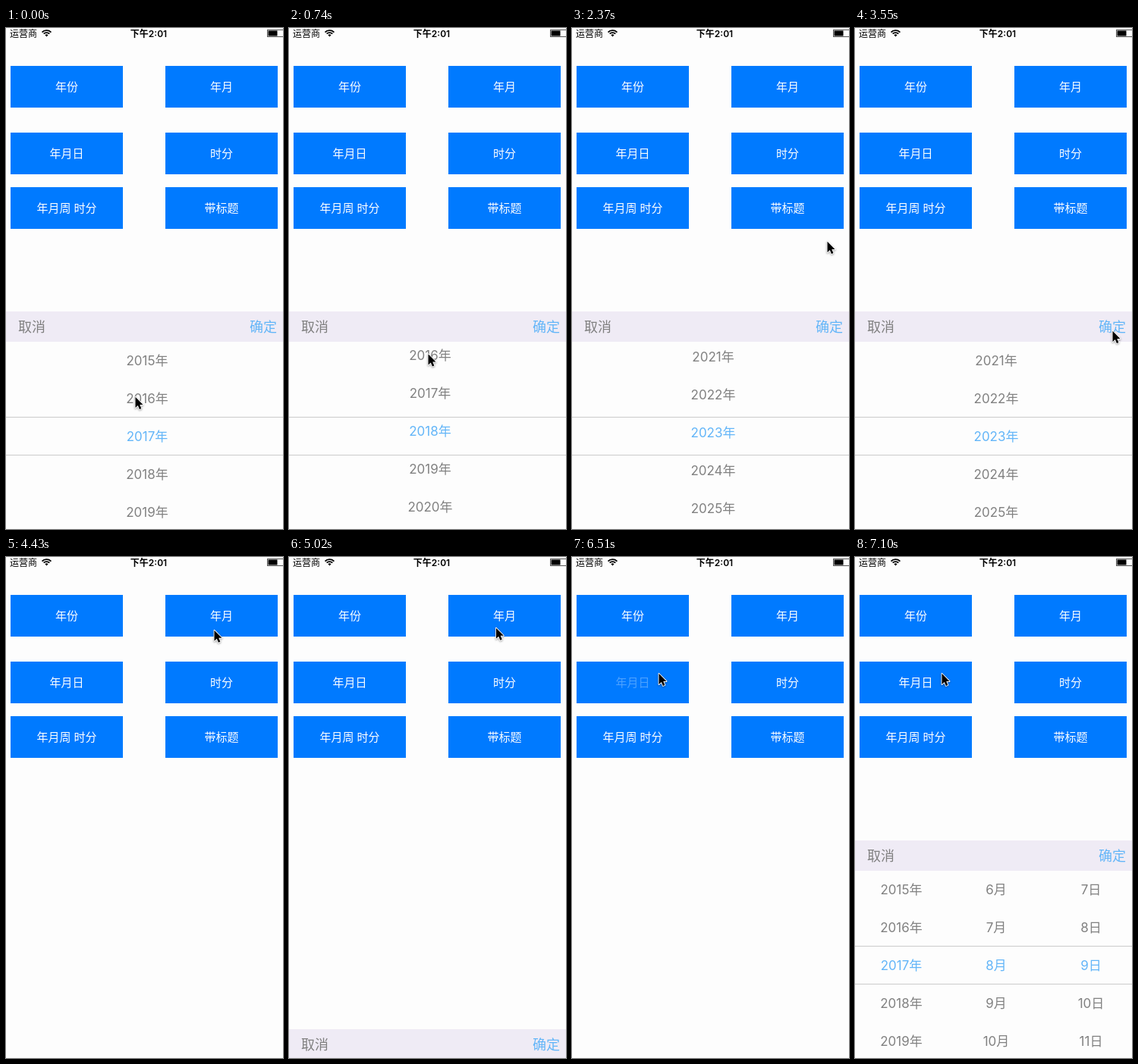
Animation of 365 by 661 pixels, one loop 7990 ms. Source, as an HTML page with a canvas:

```html
<!DOCTYPE html>
<html lang="zh-CN">
<head>
<meta charset="utf-8">
<title>日期选择器</title>
<style>
html, body { margin: 0; width: 100%; height: 100%; overflow: hidden; background: #fdfdfd; }
canvas { display: block; width: 365px; height: 661px; }
</style>
</head>
<body>
<canvas id="stage" width="365" height="661"></canvas>
<script>
const ctx = document.getElementById('stage').getContext('2d');
const W = 365, H = 661, LOOP = 7990, TICK = 147.7;
const PANEL_TOP = 374, BAR = 40, ROW = 50, MID = 538.5;
const FONT = 'Inter, "Noto Sans CJK SC", "Noto Sans CJK", sans-serif';
const BG = '#fdfdfd', BLUE = '#007aff', GRAY = '#808080', SKY = '#62b5f8';

const BUTTONS = [
  [6, 50, '年份'], [210, 50, '年月'],
  [6, 138, '年月日'], [210, 138, '时分'],
  [6, 210, '年月周 时分'], [210, 210, '带标题']
];

// Pointer stops: time, x, y
const POINTER = [
  [0, 170, 486], [300, 171, 486], [850, 186, 396], [1040, 230, 402],
  [1180, 268, 399], [1330, 314, 326], [1478, 336, 281], [2520, 336, 281],
  [2670, 342, 290], [2960, 349, 335], [3250, 346, 385], [3540, 339, 399],
  [3780, 339, 399], [3990, 334, 340], [4140, 318, 225], [4290, 290, 130],
  [4430, 274, 96], [4730, 273, 90], [5020, 273, 90], [5170, 262, 140],
  [5310, 240, 220], [5460, 216, 290], [5610, 206, 314], [6000, 206, 314],
  [6210, 170, 240], [6360, 120, 165], [6500, 114, 153]
];

const clamp = v => Math.max(0, Math.min(1, v));
const ramp = (t, from, to) => clamp((t - from) / (to - from));
const ease = p => p * p * (3 - 2 * p);
const slide = (t, from) => ease(ramp(t, from, from + 300));

// Drag, then momentum, then snap to the nearest row
function wheelOffset(t) {
  if (t < 850) return 90 * ramp(t, 200, 850) ** 2.5;
  const glide = 316 - 64 * Math.exp((1480 - Math.min(t, 2380)) / 500);
  return glide + (300 - glide) * ease(ramp(t, 2400, 2800));
}

function pointerAt(t) {
  let i = POINTER.findIndex(p => p[0] > t);
  if (i < 0) i = POINTER.length;
  const a = POINTER[i - 1], b = POINTER[i] || a;
  const p = a === b ? 0 : ramp(t, a[0], b[0]);
  const x = a[1] + (b[1] - a[1]) * p;
  const y = t < 850 ? 486 - wheelOffset(t) : a[2] + (b[2] - a[2]) * p;
  return [x, y];
}

// Share of the panel that is hidden below the stage
function hiddenShare(t) {
  if (t < 4500) return slide(t, 3760);
  if (t < 5900) return 1 - slide(t, 4960);
  if (t < 6600) return slide(t, 6000);
  return 1 - slide(t, 6730);
}

function rect(x, y, w, h, color) {
  ctx.fillStyle = color;
  ctx.fillRect(x, y, w, h);
}

function label(str, x, cy, size, color, align = 'center', weight = 400) {
  ctx.font = `${weight} ${size}px ${FONT}`;
  ctx.textAlign = align;
  ctx.fillStyle = color;
  ctx.fillText(str, x, cy + size * 0.375);
}

function statusBar() {
  label('运营商', 5, 7.2, 12, '#000', 'left');
  label('下午2:01', 188, 7.2, 12, '#000', 'center', 600);

  ctx.strokeStyle = '#000';
  ctx.lineWidth = 1.8;
  for (const r of [8.2, 5.2]) {
    ctx.beginPath();
    ctx.arc(53.5, 11.3, r, -Math.PI * 0.76, -Math.PI * 0.24);
    ctx.stroke();
  }
  ctx.fillStyle = '#000';
  ctx.beginPath();
  ctx.moveTo(53.5, 11.6);
  ctx.arc(53.5, 11.3, 2.9, -Math.PI * 0.76, -Math.PI * 0.24);
  ctx.fill();

  ctx.lineWidth = 1;
  ctx.strokeStyle = '#555';
  ctx.strokeRect(344.5, 2.5, 24, 9);
  rect(345.5, 3.5, 12, 7, '#000');
}

function buttons(pressed) {
  BUTTONS.forEach(([x, y, text], i) => {
    rect(x, y, 148, 55, BLUE);
    const color = i === pressed ? 'rgba(255,255,255,.3)' : '#fff';
    label(text, x + 74, y + 27.5, 15, color, 'center', 350);
  });
}

function column(x, first, unit, offset) {
  const center = Math.round(offset / ROW);
  for (let i = center - 3; i <= center + 3; i++) {
    const color = i === center ? SKY : GRAY;
    label(first + i + unit, x, MID + i * ROW - offset, 17, color);
  }
}

function panel(t) {
  const hidden = hiddenShare(t);
  if (hidden >= 1) return;
  ctx.save();
  ctx.translate(0, Math.round(hidden * (H - PANEL_TOP)));
  rect(0, PANEL_TOP, W, H - PANEL_TOP, BG);
  rect(0, PANEL_TOP, W, BAR, '#efebf5');
  label('取消', 16, 394, 18, GRAY, 'left');
  label('确定', 357, 394, 18, SKY, 'right');

  ctx.beginPath();
  ctx.rect(0, PANEL_TOP + BAR, W, H - PANEL_TOP - BAR);
  ctx.clip();
  rect(0, 513, W, 1, '#cbcbcb');
  rect(0, 563, W, 1, '#cbcbcb');
  if (t < 4500) {
    column(186, 2017, '年', wheelOffset(t));
  } else if (t < 6600) {
    column(92.5, 2017, '年', 0);
    column(280, 8, '月', 0);
  } else {
    column(61, 2017, '年', 0);
    column(186, 8, '月', 0);
    column(311, 9, '日', 0);
  }
  ctx.restore();
}

function pointer(x, y) {
  const arrow = new Path2D('M0 0V14.2L3.3 11.1L5.4 16.2L7.9 15.1L5.8 10.2H10Z');
  ctx.save();
  ctx.translate(x + 0.5, y + 0.8);
  ctx.lineJoin = 'round';
  ctx.lineWidth = 1.8;
  ctx.strokeStyle = '#fff';
  ctx.shadowColor = 'rgba(0,0,0,.4)';
  ctx.shadowBlur = 2.5;
  ctx.shadowOffsetY = 1;
  ctx.stroke(arrow);
  ctx.shadowColor = 'transparent';
  ctx.fillStyle = '#000';
  ctx.fill(arrow);
  ctx.restore();
}

function draw(now) {
  const tick = Math.min(53, Math.floor((now % LOOP + 5) / TICK));
  const t = tick * 147.9;
  const pressed = tick === 33 ? 1 : tick === 44 || tick === 45 ? 2 : -1;
  rect(0, 0, W, H, BG);
  statusBar();
  buttons(pressed);
  panel(t);
  pointer(...pointerAt(t));
}

const start = performance.now();
function frame() {
  draw(performance.now() - start);
  requestAnimationFrame(frame);
}
frame();
</script>
</body>
</html>
```
